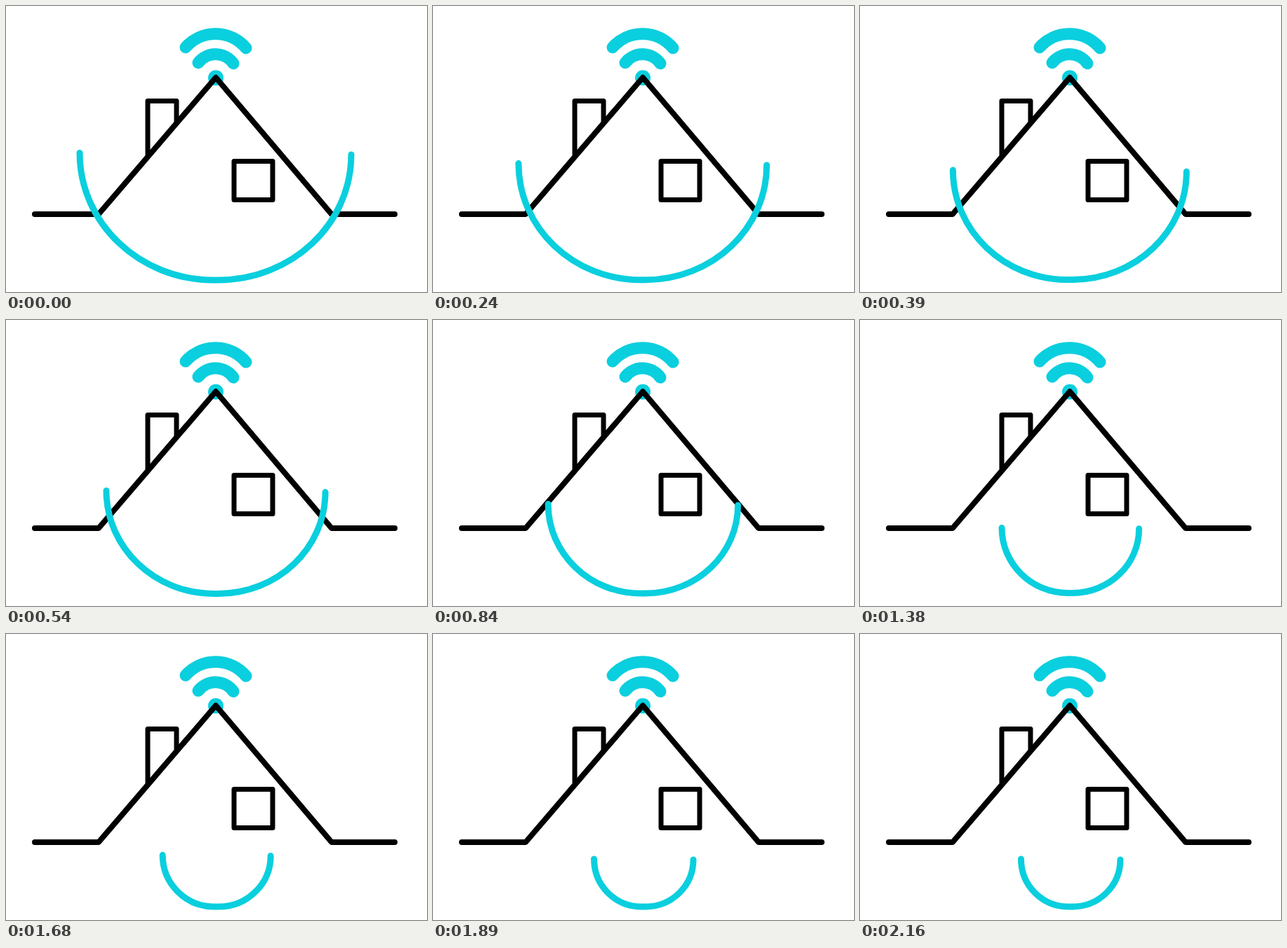
Write an HTML page that moves like this. It is 600 by 408 pixels and loops after 2.28 s.

```html
<!DOCTYPE html>
<html lang="en">
<head>
<meta charset="utf-8">
<title>Smart home</title>
<style>
  html, body { margin: 0; width: 100%; height: 100%; overflow: hidden; background: #fff; }
  svg { display: block; width: 600px; height: 408px; }
  path, rect { fill: none; stroke-linecap: round; stroke-linejoin: round; }
  .signal { stroke: #0acfde; stroke-width: 17; }
  .dot { fill: #0acfde; }
  .house { stroke: #000; stroke-width: 8; }
  .detail { stroke: #000; stroke-width: 7; }
  .smile {
    stroke: #0acfde;
    stroke-width: 9;
    animation: shrink 2280ms infinite;
  }
  /* Shrinks evenly in 30 ms steps until 1770 ms, then rests. */
  @keyframes shrink {
    0% {
      d: path("M105 209.5 C105 309.7 190 391 296 391 L302 391 C407.5 391 492 310.9 492 212");
      animation-timing-function: steps(59, end);
    }
    77.6316%, 100% {
      d: path("M229.5 321 C229.5 358.6 259.5 389 297 389 L303 389 C340.5 389 371 359 371 322");
    }
  }
</style>
</head>
<body>
<svg viewBox="0 0 600 408">
  <path class="signal" d="M256 59 A56.5 56.5 0 0 1 342 60"/>
  <path class="signal" d="M274 81 A31 31 0 0 1 324 82"/>
  <circle class="dot" cx="299" cy="102.5" r="11"/>
  <path class="detail" d="M202 212 V135.5 H243 V165"/>
  <rect class="detail" x="325" y="221.5" width="55" height="55"/>
  <path class="house" d="M41 297 H132 L299 102 L464 297 H554"/>
  <path class="smile" d="M105 209.5 C105 309.7 190 391 296 391 L302 391 C407.5 391 492 310.9 492 212"/>
</svg>
</body>
</html>
```
